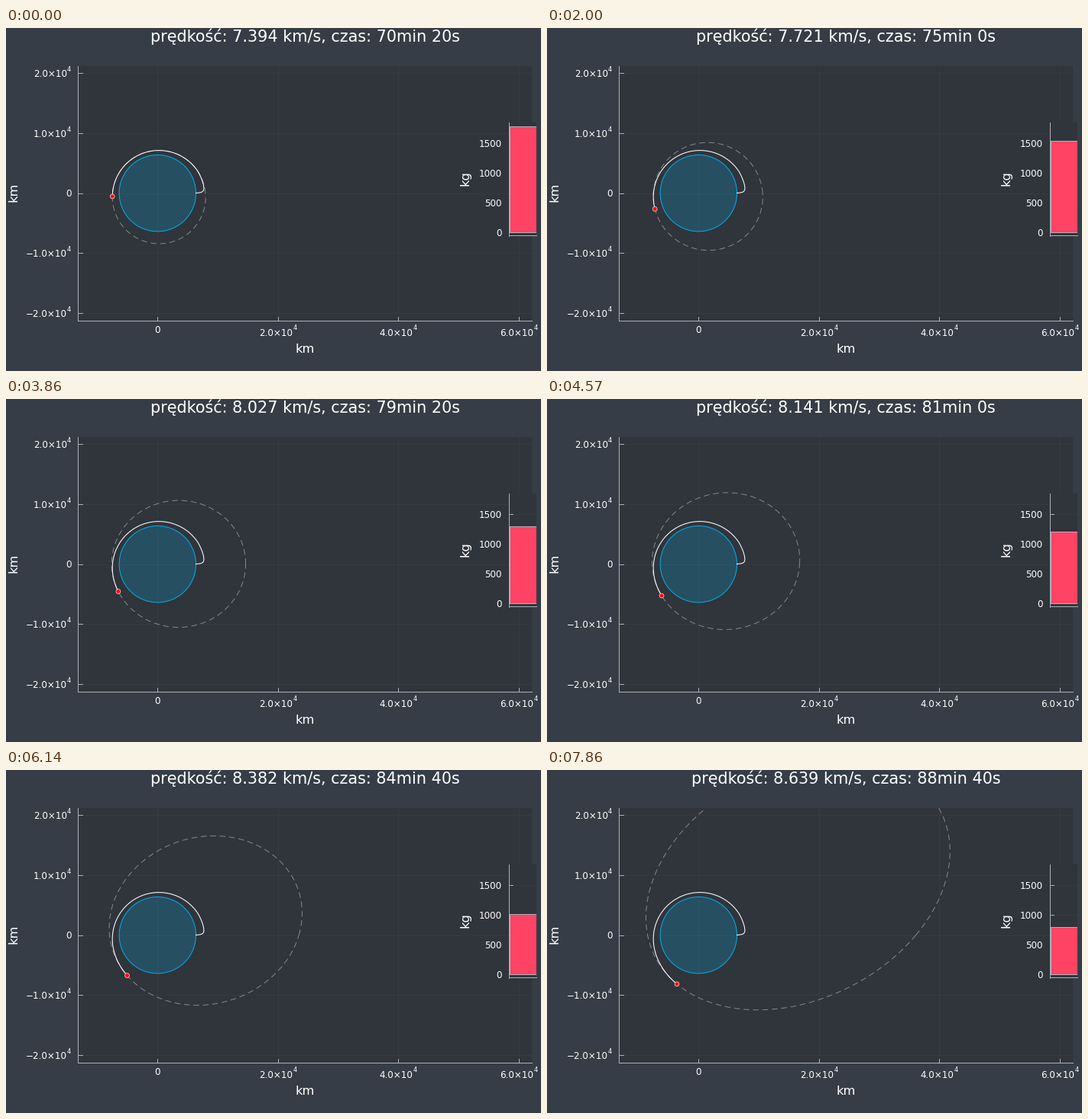
Animation, 700 px wide and 450 px high, one loop 8000 ms. Source, as a matplotlib script:

```python
import numpy as np
import matplotlib.pyplot as plt
from matplotlib.animation import FuncAnimation
from matplotlib.patches import Circle, Rectangle

W, H, DPI = 700, 450, 100
STATES, LOOP, TICK = 56, 8000, 40   # poses per loop, ms, ms
STEP = 20                           # simulated seconds per pose
PT = 72 / DPI                       # points per pixel

BACK, PANEL, FORE = "#363d46", "#30343b", "#adb2b7"
MU = 398600.0
KM = 0.007878                       # pixels per km
OX, OY = 198.3, 216.7               # planet centre

plt.rcParams["font.family"] = "DejaVu Sans"
fig = plt.figure(figsize=(W / DPI, H / DPI), dpi=DPI, facecolor=BACK)
ax = fig.add_axes([0, 0, 1, 1])
ax.set_xlim(0, W)
ax.set_ylim(H, 0)
ax.axis("off")


def px(r, angle):
    """Polar position in km to stage pixels."""
    return OX + KM * r * np.cos(angle), OY - KM * r * np.sin(angle)


def line(xs, ys, color=FORE, width=1.0, **kw):
    return ax.plot(xs, ys, color=color, lw=width * PT, **kw)[0]


def label(x, y, s, size=11.86, ha="center", **kw):
    return ax.text(x, y, s, size=size * PT, color="white", ha=ha,
                   va="baseline", zorder=9, **kw)


def side_label(right, y, s):
    label(right, y, s, 16.3, "right", rotation=90).set(va="center")


def sci(right, base, s):
    label(right, base - 7, "4", 8.4, "right")
    label(right - 5.4, base, s + "×10", ha="right")


def panel(x0, y0, x1, y1, z):
    return ax.add_patch(Rectangle((x0, y0), x1 - x0, y1 - y0,
                                  fc=PANEL, ec="none", zorder=z))


def bezier(p0, p1, p2, p3, n=20):
    u = np.linspace(0, 1, n)[:, None]
    p0, p1, p2, p3 = map(np.array, (p0, p1, p2, p3))
    return ((1 - u) ** 3 * p0 + 3 * u * (1 - u) ** 2 * p1
            + 3 * u ** 2 * (1 - u) * p2 + u ** 3 * p3)


# speed in km/s as a smooth curve over the burn
knots = np.array([0, 14, 22, 27, 37, 43, 55])
speeds = [7.394, 7.721, 7.911, 8.027, 8.252, 8.382, 8.639]
speed = np.poly1d(np.polyfit(knots / 55, speeds, 6))
accel = speed.deriv()


def rates(t, state):
    """Flight under gravity with thrust at right angles to the radius."""
    r, gamma, _ = state
    u = t / (55 * STEP)
    v, dv = speed(u), accel(u) / (55 * STEP)
    g = MU / r ** 2
    thrust = (dv + g * np.sin(gamma)) / np.cos(gamma)
    turn = (v / r - g / v) * np.cos(gamma) - thrust * np.sin(gamma) / v
    return np.array([v * np.sin(gamma), turn, v * np.cos(gamma) / r])


def fly():
    dt = 2.0
    state = np.array([7524.0, 0.083, np.radians(184.1)])
    out = [state]
    for k in range(STATES - 1):
        for i in range(int(STEP / dt)):
            t = k * STEP + i * dt
            mid = state + rates(t, state) * dt / 2
            state = state + rates(t + dt / 2, mid) * dt
        out.append(state)
    return np.array(out)


def orbit(k, angles):
    """Osculating ellipse at pose k, as radii for the given angles."""
    r, gamma, theta = states[k]
    v = speed(k / 55)
    h = r * v * np.cos(gamma)
    p = h * h / MU
    ec, es = p / r - 1, v * np.sin(gamma) * h / MU
    peri = theta - np.arctan2(es, ec)
    return p / (1 + np.hypot(ec, es) * np.cos(angles - peri))


states = fly()
turn = np.linspace(0, 2 * np.pi, 721)
path = np.column_stack(px(states[:, 0], states[:, 2]))

# launch, then coasting up to the start of the burn
coast = np.linspace(np.radians(28), states[0, 2], 160)
coast = np.column_stack(px(orbit(0, coast), coast))
past = np.vstack([
    bezier((248.6, 216.5), (254, 216), (258.8, 216), (258.9, 210.5)),
    bezier((258.9, 210.5), (258.8, 204), (255, 195), coast[0]),
    coast,
])

# main plot
main = panel(94.5, 49.5, 688, 384, 0)
for i in range(4):
    x = OX + i * 2e4 * KM
    line([x, x], [49.5, 384], alpha=0.05, zorder=1)
    line([x, x], [383.5, 379], zorder=2)
    if i:
        sci(x + 24.7, 403.5, f"{2 * i}.0")
    else:
        label(x, 400.5, "0")
for i in range(-2, 3):
    y = OY - i * 1e4 * KM
    line([95, 688], [y, y], alpha=0.05, zorder=1)
    line([95, 99.5], [y, y], zorder=2)
    if i:
        sci(85.3, y + 4.6, f"{i}.0".replace("-", "−"))
    else:
        label(85.3, y + 4.3, "0", ha="right")
line([94.4, 94.4], [49.5, 383.9], zorder=2)
line([94.4, 688], [383.9, 383.9], zorder=2)
label(391.5, 426.3, "km", 16.3)
side_label(17.6, 215.8, "km")

# planet, orbit, trail and craft
ax.add_patch(Circle((OX, OY), 6371 * KM, fc=(0, 0.75, 1, 0.2),
                    ec=(0, 0.69, 0.93), lw=PT, zorder=3))
ellipse = line([], [], "#8b8d89", 0.95, dashes=(8, 5), zorder=4)
ellipse.set_clip_path(main)
trail = line([], [], "white", 1.05, zorder=5)
craft = ax.add_patch(Circle((0, 0), 2.9, fc="red", ec="#f4d0d0",
                            lw=0.8 * PT, zorder=6))

# fuel gauge
ZERO, KG = 268.3, 0.078
gauge = panel(658.5, 123.7, 694, 272.5, 6.5)
for m in range(0, 1501, 500):
    y = ZERO - m * KG
    line([659, 694], [y, y], alpha=0.05, zorder=7)
    line([659, 663], [y, y], zorder=7)
    label(649, y + 4.3, str(m), ha="right")
line([658.4, 658.4], [123.7, 272.5], zorder=8)
line([658.4, 694], [272.4, 272.4], zorder=8)
bar = ax.add_patch(Rectangle((659.4, ZERO), 50, 0, fc="#fe4365", ec=FORE,
                             lw=PT, zorder=7.5))
bar.set_clip_path(gauge)
side_label(608.5, 197.3, "kg")

title = label(391.3, 18.3, "", 20.75)


def draw(i):
    k = (i * TICK + TICK - 1) * STATES // LOOP
    ellipse.set_data(*px(orbit(k, turn), turn))
    trail.set_data(*np.vstack([past, path[1:k + 1]]).T)
    craft.center = path[k]
    fuel = (1790 - 18 * k) * KG
    bar.set_y(ZERO - fuel)
    bar.set_height(fuel)
    minutes, seconds = divmod(4220 + STEP * k, 60)
    title.set_text(f"prędkość: {speed(k / 55):.3f} km/s, "
                   f"czas: {minutes}min {seconds}s")
    return ellipse, trail, craft, bar, title


anim = FuncAnimation(fig, draw, frames=LOOP // TICK, interval=TICK,
                     init_func=lambda: draw(0), repeat=True, repeat_delay=0)
plt.show()
```
